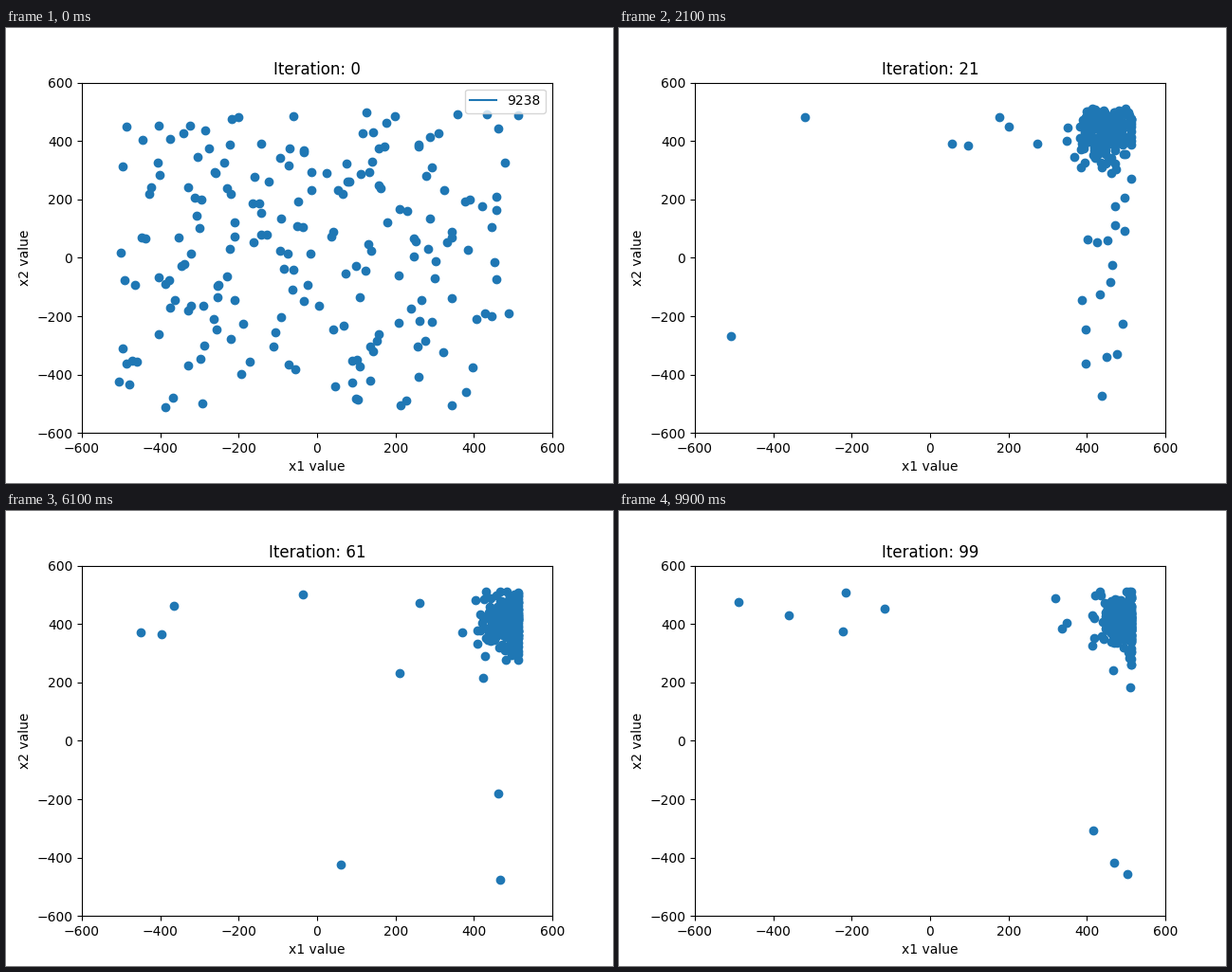
These frames come from a looping animation (640x480 px, 10000 ms). A matplotlib script:

```python
import numpy as np
import matplotlib.pyplot as plt
from matplotlib.animation import FuncAnimation

FRAMES = 100
POP = 200
MUTANTS = 2
LIMIT = 512
SEED = 9238


def fade(gen, start, end, tau):
    """Exponential approach from start to end."""
    return end + (start - end) * np.exp(-gen / tau)


def scatter_tail(rng, values, share, skew):
    """Send a share of the values away from the upper limit."""
    tail = LIMIT - 2 * LIMIT * rng.rand(POP) ** skew
    return np.where(rng.rand(POP) < share, tail, values)


def population(gen):
    rng = np.random.RandomState(SEED + gen)
    # Main cluster, piled up on the right limit and mirrored at the top
    x = rng.normal(fade(gen, 410, 500, 32), fade(gen, 65, 33, 14), POP)
    x = np.minimum(x, LIMIT)
    y = rng.normal(fade(gen, 460, 410, 25), fade(gen, 72, 54, 12), POP)
    y = LIMIT - np.abs(LIMIT - y)

    share = fade(gen, 1, 0.045, 8)
    skew = fade(gen, 1, 2.7, 30)
    points = np.column_stack([scatter_tail(rng, x, share, skew),
                              scatter_tail(rng, y, share, skew)])
    points[:MUTANTS] = rng.uniform(-LIMIT, LIMIT, (MUTANTS, 2))
    return points


plt.rcParams["text.kerning_factor"] = 6
fig, ax = plt.subplots(figsize=(6.4, 4.8), dpi=100)
dots = ax.scatter([], [], color="C0")
ax.plot([], [], color="C0", label=str(SEED))
legend = ax.legend(loc="upper right")
title = ax.set_title("Iteration: 0")
ax.set(xlim=(-600, 600), ylim=(-600, 600),
       xlabel="x1 value", ylabel="x2 value")


def update(gen):
    dots.set_offsets(population(gen))
    title.set_text(f"Iteration: {gen}")
    legend.set_visible(gen == 0)
    return dots, title, legend


anim = FuncAnimation(fig, update, frames=FRAMES, interval=100,
                     repeat=True, repeat_delay=0)
plt.show()
```
